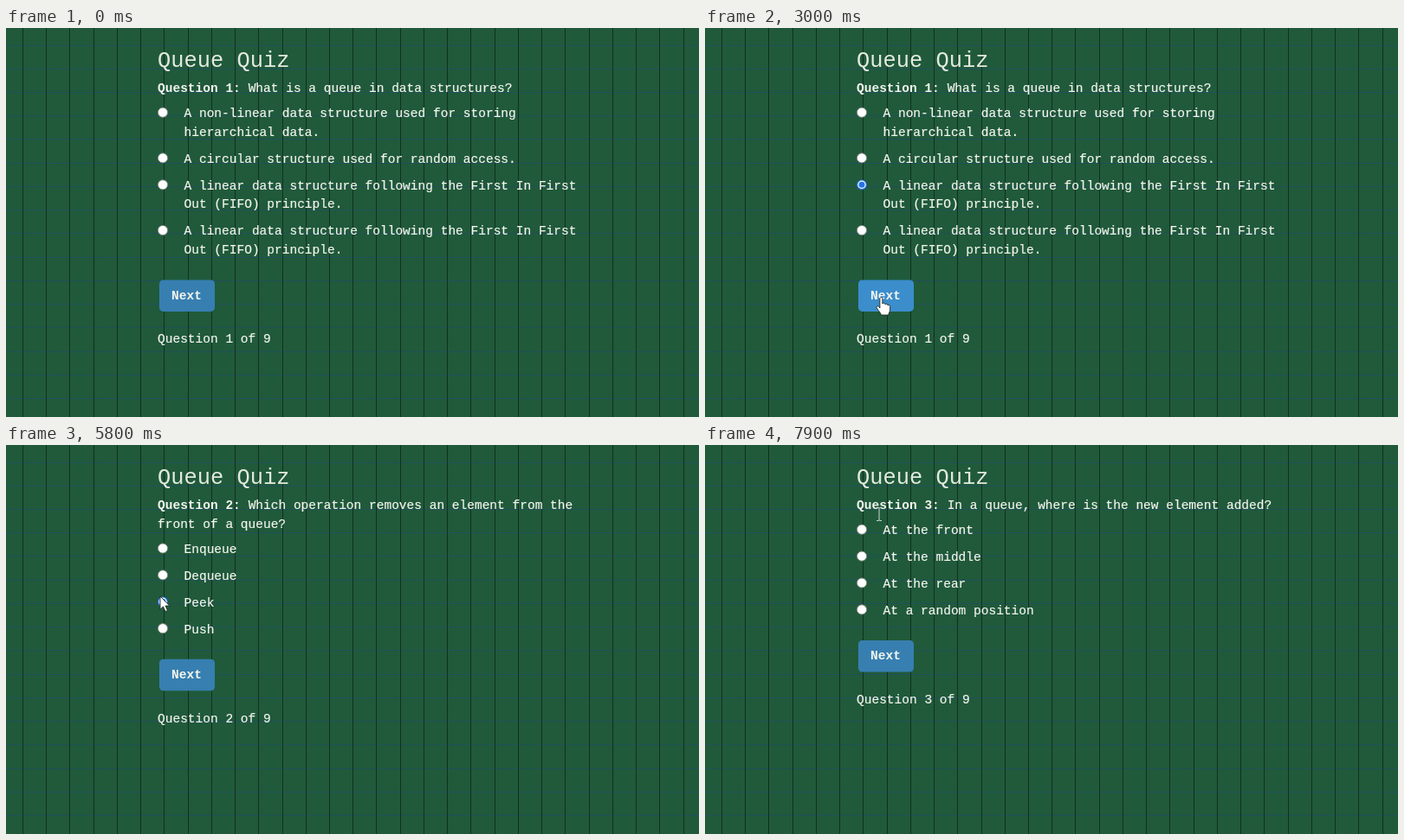
An HTML page for the animation above (8000 ms loop, 800 by 450 pixels).

```html
<!DOCTYPE html>
<html lang="en">
<head>
<meta charset="utf-8">
<title>Queue Quiz</title>
<style>
html, body { margin: 0; width: 100%; height: 100%; overflow: hidden; background: #205a3b; }
svg { display: block; width: 800px; height: 450px; }
text { font: 14.53px "Liberation Mono", "Courier New", monospace; fill: #f3f5ee; stroke: #f3f5ee; stroke-width: .2px; }
.title { font-size: 25.4px; fill: #e3eadf; stroke: none; }
.bold { font-weight: bold; stroke: none; }
</style>
</head>
<body>
<svg viewBox="0 0 800 450">
  <g id="grid"></g>
  <text class="title" x="175" y="45">Queue Quiz</text>
  <g id="quiz"></g>
  <g id="cursor"></g>
</svg>
<script>
const LOOP = 8000, STEP = 100, LINE = 21.8, CHAR = 8.72, LEFT = 175;

const quiz = [
  { until: 3200, picked: 1900, choice: 2,
    ask: ["What is a queue in data structures?"],
    options: [
      ["A non-linear data structure used for storing", "hierarchical data."],
      ["A circular structure used for random access."],
      ["A linear data structure following the First In First", "Out (FIFO) principle."],
      ["A linear data structure following the First In First", "Out (FIFO) principle."]] },
  { until: 6800, picked: 5700, choice: 2,
    ask: ["Which operation removes an element from the", "front of a queue?"],
    options: [["Enqueue"], ["Dequeue"], ["Peek"], ["Push"]] },
  { until: LOOP, picked: Infinity, choice: -1,
    ask: ["In a queue, where is the new element added?"],
    options: [["At the front"], ["At the middle"], ["At the rear"], ["At a random position"]] }
];

// Pointer stops: time, x, y
const path = [
  [800, 330, 420], [1500, 178, 174], [2000, 178, 174], [2700, 204, 312], [3100, 203.5, 312],
  [3400, 399, 350], [3600, 399, 350], [4400, 270, 252], [4600, 270, 252], [5000, 191, 195],
  [5400, 178, 175], [5800, 178, 175], [6300, 207.5, 266], [6700, 207.5, 266],
  [7000, 330, 329], [7300, 428, 146], [7900, 201, 80]
];

const shapes = {
  arrow: '<path d="M0 0V15.2L3.5 11.9 5.9 17.6 8.5 16.5 6.1 11H10.8Z" fill="#fff" stroke="#1c2b24" stroke-width=".9"/>',
  hand: `<path d="M-1.7 1C-1.7-1 1.3-1 1.3 1V7C2-.0 4.6 6 4.6 8 5.3 6.4 7.5 7 7.5 9
    8.4 7.7 10 8.5 10 10.3V14C10 16.5 8.5 17 8.3 20H-.2C-.7 17.5-3.5 15-5.2 12
    -6.2 10-4-9 10-2.8 10.2L-1.7 12Z" fill="#fff" stroke="#1c2b24" stroke-width=".9" stroke-linejoin="round"/>`
    .replace("C2-.0 4.6 6 4.6 8", "C2 5.5 4.6 6 4.6 8").replace("-6.2 10-4-9 10-2.8 10.2", "-6.4 10-4 9-2.8 10.5"),
  beam: '<path d="M-3-7.5H-1Q0-7.5 0-6.5Q0-7.5 1-7.5H3M0-6.5V6.5M-3 7.5H-1Q0 7.5 0 6.5Q0 7.5 1 7.5H3" fill="none" stroke="#cbd8cf"/>'
};

const get = id => document.getElementById(id);
const text = (x, y, s, cls = "") => `<text x="${x}" y="${y}" class="${cls}">${s}</text>`;
const disc = (y, r, fill, extra = "") => `<circle cx="181" cy="${y}" r="${r}" fill="${fill}" ${extra}/>`;

function drawGrid() {
  let rows = "", cols = "";
  for (let k = 0; k < 29; k++) {
    const shift = 27.24 * k;
    cols += `M${Math.floor(19.4 + shift) + .5} 0V450`;
    rows += `M0 ${Math.floor(20 + shift) + .5}H800`;
  }
  get("grid").innerHTML = `<path d="${rows}" stroke="#20505a"/><path d="${cols}" stroke="#12301f"/>`;
}

function pointer(t) {
  if (t < path[0][0]) return null;
  const i = path.findIndex(p => p[0] > t);
  if (i < 0) return path[path.length - 1].slice(1);
  const [t0, x0, y0] = path[i - 1], [t1, x1, y1] = path[i];
  const u = (t - t0) / (t1 - t0), e = u * u * (3 - 2 * u);
  return [x0 + (x1 - x0) * e, y0 + (y1 - y0) * e];
}

function radio(y, on, hover) {
  if (on) return disc(y, 5.9, "#2474e5") + disc(y, 4.7, "#fff") + disc(y, 3.5, "#2474e5");
  return disc(y, 5.6, hover ? "#c3cbc5" : "#fff", 'stroke="#77817a" stroke-width=".9"');
}

function render(t) {
  const n = quiz.findIndex(q => t < q.until), q = quiz[n];
  const at = pointer(t);
  const over = (x, y, w, h) => at && at[0] >= x && at[0] <= x + w && at[1] >= y && at[1] <= y + h;
  let shape = "arrow", y = 74;
  let out = text(LEFT, y, `Question ${n + 1}:`, "bold");

  q.ask.forEach((s, i) => {
    const x = i ? LEFT : LEFT + 12 * CHAR;
    out += text(x, y, s);
    if (over(LEFT, y - 15, x - LEFT + s.length * CHAR, LINE)) shape = "beam";
    y += LINE;
  });
  y += 7.2;

  q.options.forEach((lines, i) => {
    out += radio(y - 5.3, i === q.choice && t >= q.picked, over(175, y - 13, 12, 14));
    for (const s of lines) {
      out += text(205.5, y, s);
      y += LINE;
    }
    y += 9.1;
  });

  const top = y - .6, hover = over(177, top, 64, 36.5);
  if (hover) shape = "hand";
  out += `<rect x="177" y="${top}" width="64" height="36.5" rx="4.5" fill="${hover ? "#3b8dcc" : "#377fb1"}"/>`;
  out += text(191, top + 22.3, "Next", "bold");

  const count = `Question ${n + 1} of ${quiz.length + 6}`;
  out += text(LEFT, top + 73, count);
  if (over(LEFT, top + 58, count.length * CHAR, LINE)) shape = "beam";

  get("quiz").innerHTML = out;
  get("cursor").innerHTML = at ? `<g transform="translate(${at})">${shapes[shape]}</g>` : "";
}

let start, last;
function frame(now) {
  start ??= now;
  const t = Math.floor((now - start) % LOOP / STEP) * STEP;
  if (t !== last) render(last = t);
  requestAnimationFrame(frame);
}

drawGrid();
render(0);
requestAnimationFrame(frame);
</script>
</body>
</html>
```
